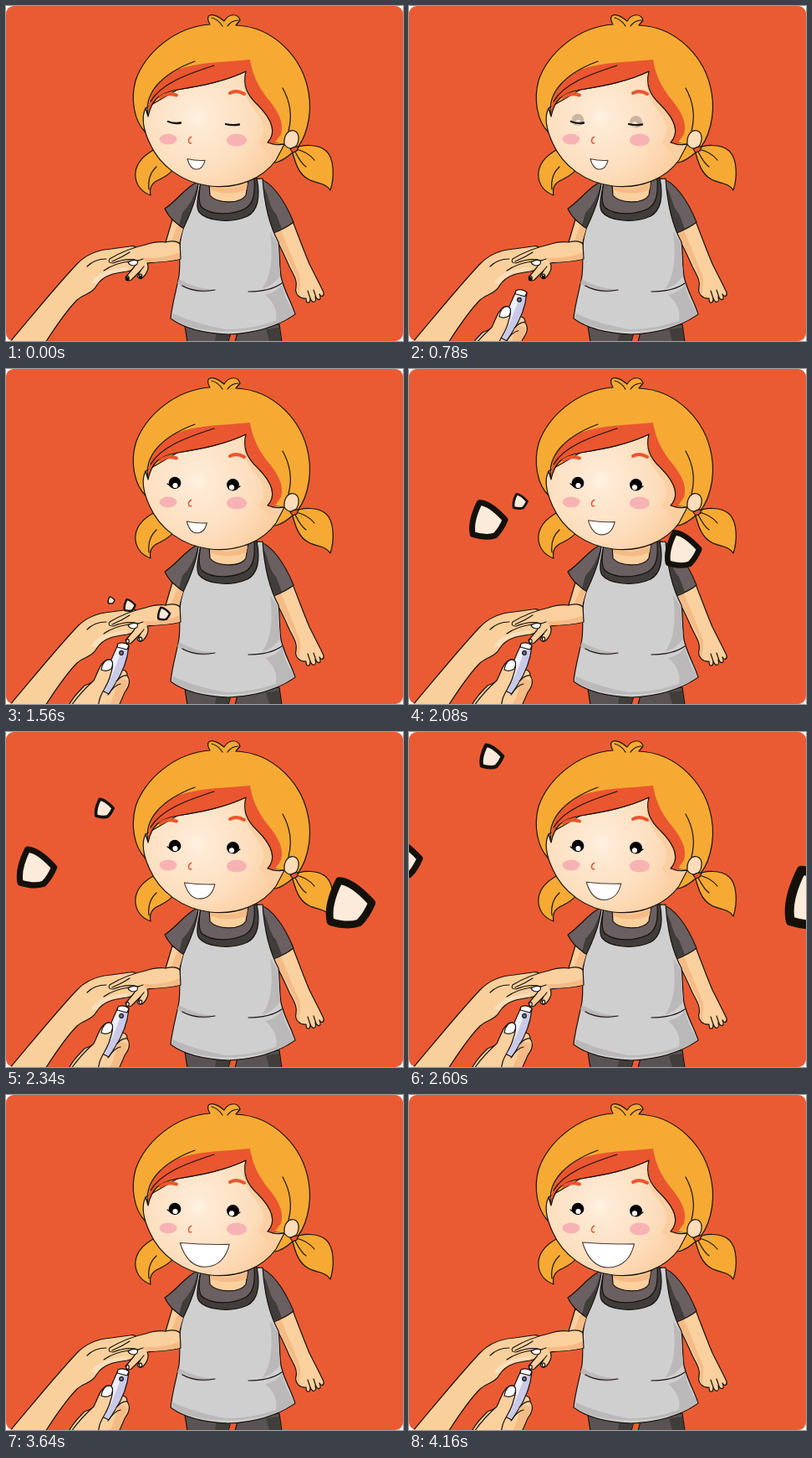
These frames come from a looping animation (475x400 px, 4.29 s). An HTML page:

```html
<!DOCTYPE html>
<html lang="en">
<head>
<meta charset="utf-8">
<title>Nail trimming</title>
<style>
  html, body { margin: 0; width: 100%; height: 100%; overflow: hidden; background: #fff; }
  svg { display: block; width: 100%; height: 100%; border-radius: 9px; background: #eb5b33; }
  .ink { stroke: #18120e; stroke-width: 1.2; stroke-linejoin: round; stroke-linecap: round; }
  .line { fill: none; }
  .hair { fill: #f6aa34; }
  .lock { fill: #ea5630; }
  .skin { fill: #fad09e; }
  .shade { fill: #f5bb86; }
  .shirt { fill: #6a5f61; }
  .dark { fill: #403d3b; }
  .dress { fill: #cfcfcf; }
  .fold { fill: #bbb8b9; }
  .white { fill: #fff; }
</style>
</head>
<body>
<svg viewBox="0 0 475 400">
  <defs>
    <radialGradient id="face" gradientUnits="userSpaceOnUse" cx="229" cy="133" r="105">
      <stop offset="0" stop-color="#fff2e2"/>
      <stop offset=".13" stop-color="#feead5"/>
      <stop offset=".6" stop-color="#fddfbf"/>
      <stop offset="1" stop-color="#fbcd9f"/>
    </radialGradient>
    <path id="chip" d="M-.44-.86Q.08-.84 .84 0Q.64.48 .34.78Q-.1.94-.78.73Q-.92.1-.44-.86Z"
      fill="#fceada" stroke="#14110b" stroke-width=".29" stroke-linejoin="round"/>
  </defs>

  <g id="pigtails" class="ink hair">
    <path d="M180 170C166 177 153 188 155 205C157 217 165 223 173 226C171 216 176 210 184 207C192 203 197 200 200 195Z"/>
    <path d="M342 172C354 164 374 165 383 173C393 182 393 205 388 220C383 211 371 212 362 207C350 201 346 187 342 172Z"/>
    <path class="line" d="M347 171Q361 174 369 184M346 174Q353 188 359 192M171 219Q169 202 180 192"/>
  </g>

  <g id="legs" class="ink">
    <path fill="#5a5354" d="M214 382L217 401H266L270 386ZM278 386L274 401H330L327 380Z"/>
    <path class="dark" stroke="none" d="M252 388L250 400H266L269 389ZM311 386L315 400H329L327 384Z"/>
  </g>

  <g id="far-arm">
    <path class="ink skin" d="M317 266L343 257C350 275 357 294 363 308C370 322 376 333 380 342C381 347 377 348 375 344C378 351 374 353 370 347C372 354 367 356 364 349C364 356 359 356 359 349C352 350 345 344 347 336C349 328 344 321 339 311C332 295 325 281 317 266Z"/>
    <path class="shade" d="M321 272L329 268C338 289 345 307 351 321C354 330 350 338 351 345C347 341 349 333 349 328C344 312 331 292 321 272Z"/>
    <path class="ink line" d="M361 340L364 349M368 339L371 348"/>
  </g>

  <g id="sleeves">
    <path class="ink shirt" d="M232 209C217 214 205 232 190 242C194 251 203 260 212 267L222 254L232 230Z"/>
    <path class="dark" d="M229 214Q224 234 211 247L207 262L212 266L222 252L232 230Z"/>
    <path class="ink shirt" d="M302 206C317 209 333 231 344 258C337 264 328 268 318 272C311 259 305 238 302 206Z"/>
    <path class="dark" d="M304 211C315 221 313 238 323 248L330 266L318 271C311 257 306 239 304 211Z"/>
  </g>

  <g id="torso">
    <path class="ink dress" d="M230 212C228 232 219 252 210 270C206 292 209 305 207 322C204 339 199 354 197 373C214 386 240 391 266 392C296 391 323 384 346 368C341 352 333 341 329 323C327 309 328 297 326 282C314 260 309 235 307 206Z"/>
    <path class="fold" d="M200 367Q222 378 262 386Q304 387 345 366L345 368C306 395 228 394 198 373ZM310 345Q326 341 330 332Q334 350 345 367Q335 376 322 380Q328 360 310 345ZM207 326Q225 337 250 339Q240 344 228 341Q213 338 205 331ZM316 270L325 283L328 322Q321 333 306 338Q322 318 316 270Z"/>
    <path class="ink line" d="M211 334Q226 343 250 339M290 341Q316 341 330 331"/>
    <path class="ink dark" d="M233 210C231 222 226 239 231 246C240 257 269 260 289 251C303 243 304 225 300 205Z"/>
    <path class="ink shirt" d="M233 211C231 222 229 236 235 241C246 250 270 250 286 242C297 236 298 222 297 206Z"/>
    <path class="ink skin" d="M243 211L244 226C252 236 280 237 287 226L290 207Z"/>
    <path class="shade" d="M244 214Q268 223 289 210L288 219Q266 228 244 219Z"/>
  </g>

  <g id="head">
    <path class="ink hair" d="M166 150C153 136 149 111 155 89C166 57 201 25 244 22C237 10 246 6 261 18C267 8 278 9 280 17L275 23C321 25 355 62 362 103C367 130 359 161 344 174C336 181 328 186 322 187L180 165Z"/>
    <path class="ink line" d="M246 14Q254 16 259 24M278 17Q270 17 265 24M331 98Q345 123 338 149"/>
    <path class="ink" fill="url(#face)" d="M167 122C162 132 164 147 172 164C184 191 211 211 244 215C278 219 308 205 323 184L333 165L314 163L319 145L287 78C262 90 235 95 205 100Z"/>
    <path fill="#fad0a3" d="M286 83C280 104 291 115 302 130C312 144 309 154 302 163L322 184L332 165L314 163C326 151 315 134 301 118Z"/>
    <path class="lock" d="M170 132C169 105 182 88 205 76C230 67 260 67 292 64C295 82 301 94 311 108C322 121 334 137 329 153L320 166L313 163C324 150 316 133 301 118C288 105 284 94 287 78C262 90 235 95 205 100C183 104 174 112 170 132Z"/>
    <path class="ink line" d="M167 122L170 132C174 112 183 104 205 100C235 95 262 90 287 78C283 94 288 106 301 118C318 135 324 151 313 163Q324 167 333 165M170 132C165 106 183 82 226 66M173 114C185 93 215 82 249 71"/>
    <path class="ink" fill="#fddcb9" d="M333 165C332 154 338 147 345 149C353 152 351 167 343 170Q337 171 333 165Z"/>
    <path class="ink lock" d="M340 171Q345 167 350 168L348 173L343 175Z"/>
    <g fill="#f7b3b3">
      <ellipse cx="194" cy="159" rx="10.5" ry="6.5"/>
      <ellipse cx="276" cy="160" rx="12" ry="7.5"/>
    </g>
    <path d="M185 109Q193 103 204 106.500M268 104Q276 99.500 285 105" fill="none" stroke="#ee542d" stroke-width="4" stroke-linecap="round"/>
    <path d="M222 156Q217 159 219 163Q221 165 222 163" fill="none" stroke="#e45a35" stroke-width="1.6"/>
    <g id="open">
      <path class="ink" d="M193 137Q196 140 200 140M280 140Q277 143 273 142"/>
      <ellipse cx="202" cy="136" rx="7.4" ry="7.2"/>
      <ellipse cx="271.5" cy="138.3" rx="7.4" ry="7.2"/>
      <g class="white">
        <circle cx="202.5" cy="139" r="3.1"/>
        <circle cx="270" cy="141.3" r="3.1"/>
      </g>
    </g>
    <path id="shut" class="line" stroke="#17110f" stroke-width="2.3" stroke-linecap="round" d="M194 138Q201 141 209 139.5M263 141Q271 143 279 141.5"/>
    <path id="mouth" class="white" stroke="#4a3a30" stroke-width="1.1" stroke-linejoin="round"/>
  </g>

  <g id="adult-hand">
    <path class="ink" fill="#f9d09c" d="M4 402C32 369 56 339 84 309C96 296 111 291 126 290L148 287C157 285 160 293 152 297L158 305C161 312 153 315 145 317C130 319 117 321 109 333C103 344 93 344 85 351C72 364 58 385 47 402Z"/>
    <path fill="#fbdfbd" d="M102 331C109 317 127 314 148 312L143 316C129 318 116 320 108 332Z"/>
    <path class="ink line" d="M97 311Q106 302 120 302M117 316Q130 307 147 305"/>
  </g>

  <g id="near-arm">
    <path class="ink skin" d="M199 255L212 266Q209 277 208 282L209 302C194 306 181 305 169 307C172 313 168 320 164 324Q160 327 157 323L161 316C157 320 153 324 150 327Q144 330 143 324L153 312L158 304Q145 300 128 307Q121 307 124 302C139 293 153 288 167 285C176 282 183 281 191 282Z"/>
    <path class="shade" d="M205 262L212 266L207 282L198 280ZM208 294Q190 302 164 301L168 306Q191 306 208 302Z"/>
    <path class="ink line" d="M191 282Q203 279 208 284M127 305Q139 300 148 294M158 304L164 302M161 316L165 311"/>
    <path class="ink white" d="M146 306Q151 302 157 304Q159 309 153 310Q148 310 146 306Z"/>
    <g class="ink white">
      <ellipse cx="145.500" cy="325" rx="1.7" ry="2.3"/>
      <ellipse cx="161" cy="322.500" rx="1.7" ry="2.3"/>
    </g>
    <g id="long-nails"><circle cx="145" cy="326" r="2.2"/><circle cx="161" cy="324" r="2.2"/></g>
  </g>

  <g id="clipper-hand">
    <path class="ink skin" d="M128 365C138 357 145 358 145 366C150 373 146 381 142 386C138 396 132 408 126 424V475H70V412C77 395 86 386 94 378L118 368Z"/>
    <path class="ink" fill="#c9c9e8" d="M134 329L147 331L145 343C141 361 132 374 123 388L113 383C119 364 125 348 134 329Z"/>
    <path fill="#efeff9" d="M134 331L140 332C133 351 126 369 118 384L114 382Q122 357 134 331Z"/>
    <path class="ink white" d="M134 328Q141 325 147 330L145 335L133 332Z"/>
    <circle class="ink" cx="138" cy="339" r="2.3" fill="#77779c"/>
    <path class="ink skin" d="M78 402C87 389 96 380 105 372C110 362 113 350 121 347C130 346 128 356 125 365C122 378 115 384 112 394L109 408H78Z"/>
    <path class="ink white" d="M114 359Q116 347 124 347Q130 349 126 358Q120 362 114 359Z"/>
    <path class="shade" d="M132 372Q140 368 146 373Q141 389 130 408L122 404Q132 388 132 372Z"/>
    <path class="ink line" d="M132 373Q139 365 145 366M122 389Q130 377 137 376"/>
  </g>

  <g id="chips"><use href="#chip"/><use href="#chip"/><use href="#chip"/></g>
</svg>

<script>
  const LOOP = 4290, HOLD = 390, STEP = 130;
  const $ = id => document.getElementById(id);
  const mix = (a, b, u) => a + (b - a) * u;
  const smooth = (a, b, v) => {
    const u = Math.min(1, Math.max(0, (v - a) / (b - a)));
    return u * u * (3 - 2 * u);
  };

  // Each stop: step, x, y, radius
  const flights = [
    [[9, 130, 303, 3], [10, 126, 276, 4.8], [14, 133, 158, 10], [15, 127, 122, 11], [18, 99, 29, 15.5], [20, 134, -3, 16]],
    [[9, 152, 305, 4], [10, 148, 282, 8], [14, 95, 180, 24], [15, 59, 167, 25], [18, -8, 151, 25], [20, -60, 140, 25]],
    [[9, 157, 311, 4], [10, 189, 292, 8.5], [14, 328, 215, 23], [15, 375, 207, 27], [18, 486, 198, 38], [20, 560, 190, 40]]
  ];
  const chips = [...$('chips').children];

  function place(chip, stops, step) {
    const next = stops.findIndex(stop => stop[0] >= step);
    const visible = next >= 0 && step >= stops[0][0];
    chip.style.display = visible ? '' : 'none';
    if (!visible) return;
    const to = stops[next], from = stops[Math.max(0, next - 1)];
    const u = to === from ? 0 : (step - from[0]) / (to[0] - from[0]);
    const [x, y, r] = [1, 2, 3].map(i => mix(from[i], to[i], u));
    chip.setAttribute('transform', `translate(${x} ${y}) scale(${r})`);
  }

  function smile(m) {
    const left = mix(217, 207.5, m), right = mix(238, 269.5, m);
    const top = mix(182.5, 176, m), end = top + 1.8, base = mix(195, 206, m);
    const mid = (left + right) / 2, w = right - left;
    return `M${left} ${top}Q${mid} ${top + 2.5} ${right} ${end}` +
      `C${right - w * .06} ${mix(top, base, .6)} ${right - w * .22} ${base} ${mid} ${base}` +
      `C${left + w * .26} ${base} ${left + w * .1} ${mix(top, base, .65)} ${left} ${top}Z`;
  }

  function draw() {
    const t = performance.now() % LOOP;
    const step = t < HOLD ? 0 : Math.floor((t - HOLD) / STEP) + 1;
    const away = Math.max(0, 1 - step / 10) ** 3.6;

    $('clipper-hand').setAttribute('transform', `translate(${-38 * away} ${74 * away})`);
    $('open').style.opacity = smooth(2, 9, step);
    $('shut').style.opacity = 1 - smooth(4, 9, step);
    $('long-nails').style.display = step < 9 ? '' : 'none';
    $('mouth').setAttribute('d', smile(smooth(6, 30, step)));
    chips.forEach((chip, i) => place(chip, flights[i], step));
    requestAnimationFrame(draw);
  }
  draw();
</script>
</body>
</html>
```
